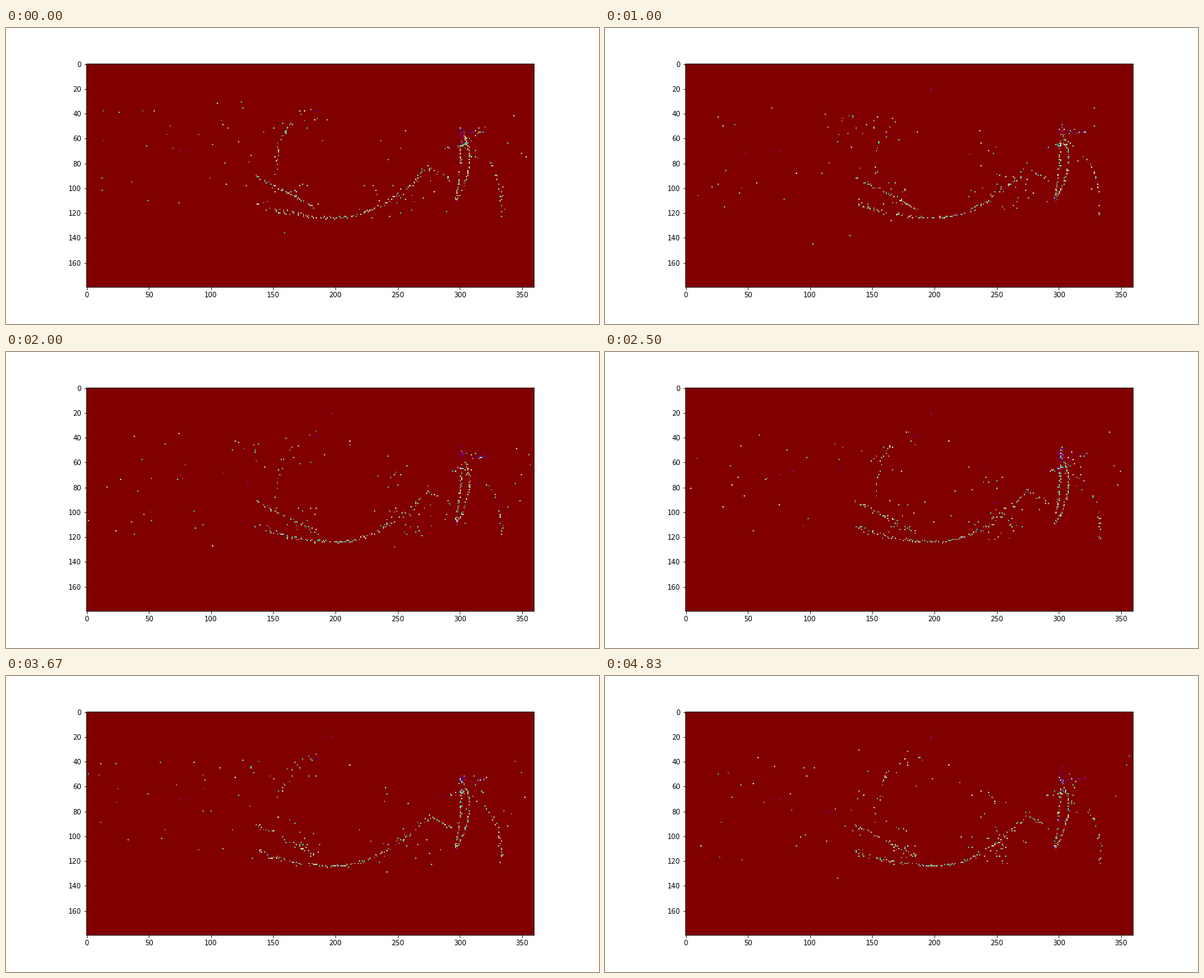
These frames come from a looping animation (864 by 432 pixels, 4990 ms). A matplotlib script:

```python
import numpy as np
import matplotlib.pyplot as plt
from matplotlib.animation import FuncAnimation

LOOP_MS, FRAMES = 4990, 30
ROWS, COLS = 180, 360

MAROON = np.array([128, 0, 0])
GREEN, CREAM = np.array([44, 200, 120]), np.array([244, 214, 144])
BLUE, MAGENTA = np.array([40, 0, 190]), np.array([190, 0, 140])

plt.rcParams.update({"font.family": "DejaVu Sans", "font.size": 10})


def mix(a, b, t):
    return a + (b - a) * t


class Scan:
    """One sweep of flickering dots on the maroon grid."""

    def __init__(self, seed):
        self.rng = np.random.default_rng(seed)
        self.grid = np.full((ROWS, COLS, 3), MAROON, np.uint8)

    def shades(self, n, dark):
        """Green to cream dots, with a share of blue to magenta ones."""
        rng = self.rng
        t = rng.random((n, 1))
        light = mix(GREEN, CREAM, t)
        light[:, 2] += rng.uniform(0, 70, n)
        ink = np.where(rng.random((n, 1)) < dark, mix(BLUE, MAGENTA, t), light)
        return mix(MAROON, ink, rng.uniform(.75, 1, (n, 1)))

    def dots(self, x, y, dark=.03):
        col, row = np.rint(x).astype(int), np.rint(y).astype(int)
        ok = (col >= 0) & (col < COLS) & (row >= 0) & (row < ROWS)
        self.grid[row[ok], col[ok]] = self.shades(ok.sum(), dark)

    def trail(self, x, y, chance, spread, dark=.03):
        """Dots along a line; the chance drifts so that they come in runs."""
        rng, n = self.rng, len(x)
        wave = 1 + .35 * np.sin(.35 * np.arange(n) + rng.uniform(0, 2 * np.pi))
        on = rng.random(n) < chance * wave
        dx, dy = rng.normal(0, spread, (2, n))
        self.dots((x + .5 * dx)[on], (y + dy)[on], dark)

    def bend(self, start, pull, end, chance, spread, dark=.03):
        """Trail on a quadratic Bezier curve."""
        n = int(np.hypot(end[0] - start[0], end[1] - start[1])) + 1
        t = np.linspace(0, 1, n)
        x, y = (a * (1 - t) ** 2 + 2 * b * t * (1 - t) + c * t ** 2
                for a, b, c in zip(start, pull, end))
        self.trail(x, y, chance, spread, dark)

    def line(self, start, end, chance, spread, dark=.03):
        mid = np.add(start, end) / 2
        self.bend(start, mid, end, chance, spread, dark)

    def cloud(self, centre, size, mean, dark=.03):
        n = self.rng.poisson(mean)
        x, y = self.rng.normal(centre, size, (n, 2)).T
        self.dots(x, y, dark)

    def field(self, left, right, mean):
        n = self.rng.poisson(mean)
        self.dots(self.rng.uniform(left, right, n), self.rng.uniform(36, 120, n))

    def speck(self, x, y, ink, chance):
        if self.rng.random() < chance:
            self.grid[y, x] = ink


def scan(i):
    s = Scan(700 + i)

    # loose returns
    s.field(0, 140, 26)
    s.field(322, 360, 5)
    s.cloud((112, 139), (14, 4), 1)
    s.cloud((152, 50), (26, 8), 14)
    s.cloud((172, 106), (9, 9), 16)
    s.cloud((243, 72), (10, 8), 9)
    s.cloud((254, 106), (16, 9), 25)

    # wide bowl, flatter on the left, with a ridge after it
    x = np.arange(136, 276)
    d = x - 200
    y = 124 - np.where(d < 0, .003, .0074) * d ** 2
    s.trail(x, y, .72, .35 + .018 * abs(d))
    s.line((275, 84), (293, 94), .5, .9)
    s.line((136, 91), (186, 117), .6, .8)
    s.bend((184, 36), (150, 50), (153, 88), .3, 2.2)

    # tower: two legs, head and crossbar
    s.bend((301, 62), (300, 92), (296, 109), .85, .6)
    s.bend((303, 58), (314, 80), (297, 109), .9, .6)
    s.cloud((301.5, 53.5), (1.4, 3), 18, .65)
    s.cloud((302, 65), (2.5, 1), 9, .1)
    s.cloud((311, 66), (4, 7), 10)
    s.line((307, 55.5), (321, 54), .85, 1, .6)
    s.line((288, 68), (300, 65), .45, .6, .5)
    s.bend((319, 74), (336, 95), (332, 123), .45, 1)

    # returns that hold their place
    s.speck(75, 70, MAGENTA, 1)
    s.speck(197, 21, MAGENTA, .75)
    s.speck(211, 43, CREAM, .8)
    s.speck(184, 38, BLUE, .8)
    s.speck(136, 112, BLUE, .9)
    s.speck(297, 110, MAGENTA, .8)
    s.speck(332, 122, MAGENTA, .85)
    return s.grid


fig, ax = plt.subplots(figsize=(12, 6), dpi=72, facecolor="white")
fig.subplots_adjust(left=.125, right=.9, bottom=.125, top=.88)
image = ax.imshow(scan(0), interpolation="nearest")


def draw(i):
    image.set_data(scan(i))
    return (image,)


anim = FuncAnimation(fig, draw, frames=FRAMES, interval=LOOP_MS / FRAMES,
                     repeat=True, repeat_delay=0, blit=False)
plt.show()
```
